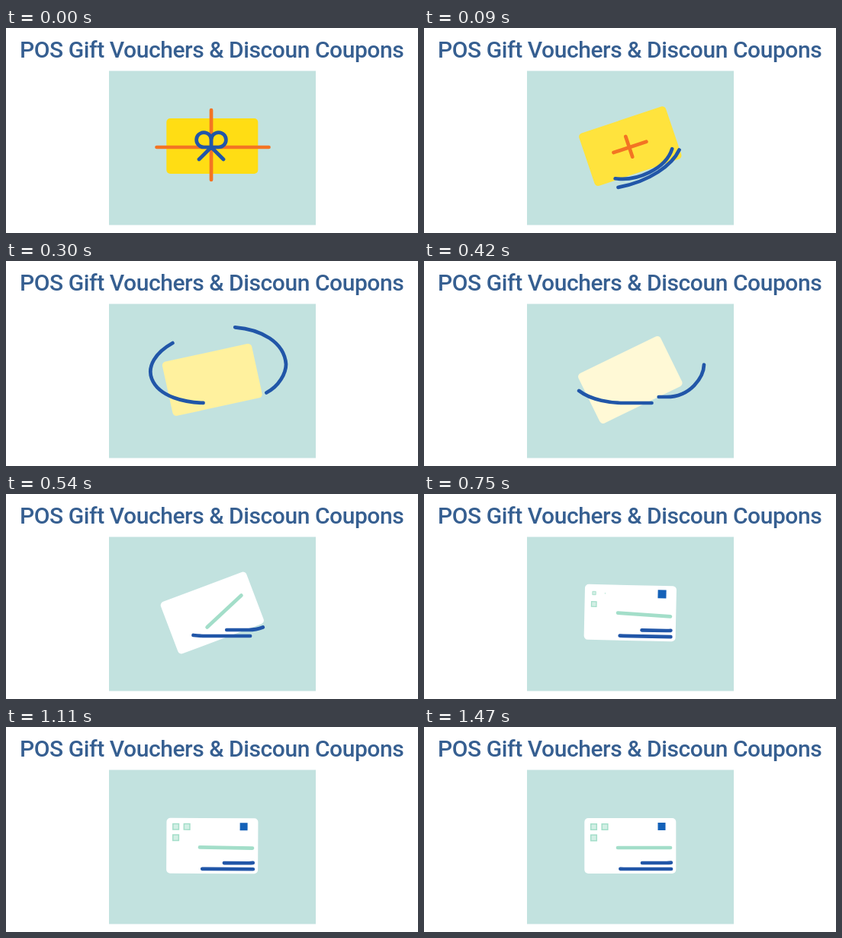
Recreate the animation shown at these times as an HTML page. Size 540 by 270 pixels, loop 2.4 s.

```html
<!DOCTYPE html>
<html lang="en">
<head>
<meta charset="utf-8">
<title>Gift vouchers</title>
<style>
  html, body { margin: 0; width: 100%; height: 100%; overflow: hidden; background: #fff; }
  svg { display: block; width: 100vw; height: 100vh; }
  text { font: 500 30px Roboto, sans-serif; letter-spacing: -0.44px; fill: #365f91; }
  .line { fill: none; stroke-width: 4.7; stroke-linecap: round; stroke-linejoin: round; }
  .blue { stroke: #2156a8; }
  .orange { stroke: #f37423; }
  .mint { stroke: #a3dec9; }
  .box { fill: #d3efe5; stroke: #a3dec9; stroke-width: 1.5; }
</style>
</head>
<body>
<svg viewBox="0 0 540 270">
  <text x="18" y="39">POS Gift Vouchers &amp; Discoun Coupons</text>
  <rect x="135" y="56.5" width="271" height="203" fill="#c2e2df"/>
  <rect id="card" x="-60" y="-36.5" width="120" height="73" rx="5"/>
  <g id="ribbon" class="line orange">
    <path id="across"/>
    <path id="down"/>
  </g>
  <path id="bow" class="line blue" d="M253 173L269 157H259.3A9.7 9.7 0 1 1 269 147.3V157L285 173M269 157H278.7A9.7 9.7 0 1 0 269 147.3"/>
  <g id="print">
    <rect id="badge" x="-5" y="-5" width="10" height="10" fill="#1461b8"/>
    <path id="strandA" class="line blue" d="M329 92C242 80 178 120 191 155C201 181 240 187 262 187H324"/>
    <path id="strandB" class="line blue" d="M221 116C254 70 363 80 367 136C367 152 350 179 318 179H286"/>
  </g>
  <path id="mint" class="line mint"/>
</svg>
<script>
const LOOP = 2400, STEP = 30, WIDTH = 4.7;
const $ = id => document.getElementById(id);

// Progress of t from a to b, then three easings of it.
const span = (t, a, b) => Math.min(1, Math.max(0, (t - a) / (b - a)));
const ease = (t, a, b) => {
  const u = span(t, a, b);
  return u ** 3 * (10 - 15 * u + 6 * u * u);
};
const easeOut = (t, a, b) => 1 - (1 - span(t, a, b)) ** 2;
const pop = (t, start) => {
  const v = span(t, start, start + 300) - 1;
  return 1 + 2.7 * v ** 3 + 1.7 * v * v;
};

const place = (el, x, y, turn = 0, size = 1) =>
  el.setAttribute("transform", `translate(${x} ${y}) rotate(${turn}) scale(${size})`);
const show = (el, on) => el.setAttribute("visibility", on ? "visible" : "hidden");

// Offset of the path while unwinding, when the tail lets go, length left at rest.
const strands = [
  { el: $("strandA"), dx: -14, dy: 0, release: 180, rest: 67 },
  { el: $("strandB"), dx: -23, dy: 12, release: 215, rest: 38 }
];
for (const s of strands) s.total = s.el.getTotalLength();

// Small squares by column and row, in order of appearance.
const boxes = [[0, 1], [0, 0], [1, 0]].map(([col, row]) => {
  const el = document.createElementNS("http://www.w3.org/2000/svg", "rect");
  for (const [k, v] of Object.entries({ x: -3.8, y: -3.8, width: 7.6, height: 7.6, class: "box" }))
    el.setAttribute(k, v);
  $("print").append(el);
  return { el, x: 222.5 + 14.5 * col, y: 131.5 + 14.5 * row };
});

function drawStrand({ el, dx, dy, release, rest, total }, t) {
  const slack = 70;
  const head = slack + (total - slack) * easeOut(t, 0, 620);
  const tail = (total - rest) * easeOut(t, release, 640);
  const size = 0.35 + 0.65 * ease(t, 0, 170);
  const away = 1 - ease(t, 180, 300);
  show(el, t > 0);
  place(el, 269 * (1 - size) + dx * away * size, 157 * (1 - size) + dy * away * size, 0, size);
  el.style.strokeWidth = WIDTH / size;
  el.style.strokeDasharray = `${head - tail} 999`;
  el.style.strokeDashoffset = -tail;
}

function drawMint(t, settle) {
  const swing = ease(t, 400, 680);
  const half = 34.5 * easeOut(t, 420, 600);
  show($("mint"), half > 0);
  place($("mint"), 283.5 + 5 * swing, 150 + 9 * swing, -90 + 94 * swing - 4 * settle);
  $("mint").setAttribute("d", `M${-half} 0H${half}`);
}

function draw(t) {
  // The card swings past half a turn, comes back and settles.
  const settle = ease(t, 750, 1300);
  const turn = -206 * ease(t, 0, 380) + 27.2 * ease(t, 440, 750) - 1.2 * settle;
  const fade = span(t, 0, 510);
  place($("card"), 270.3, 155.5 + ease(t, 0, 380), turn);
  $("card").setAttribute("fill", `rgb(255 ${221 + 34 * fade} ${20 + 235 * fade})`);

  const left = 1 - span(t, 0, 130);
  show($("ribbon"), left > 0);
  place($("ribbon"), 269.5, 157, turn);
  $("across").setAttribute("d", `M${-72 * left} 0H${75 * left}`);
  $("down").setAttribute("d", `M-.5 ${-49 * left}V${43 * left}`);
  show($("bow"), t === 0);

  $("print").setAttribute("transform", `rotate(${Math.max(0, turn + 180)} 270 156.5)`);
  for (const s of strands) drawStrand(s, t);
  boxes.forEach(({ el, x, y }, i) => place(el, x, y, 0, pop(t, 670 + 35 * i)));
  place($("badge"), 311.5, 131, 0, pop(t, 580));
  drawMint(t, settle);
}

const begin = performance.now();
function tick() {
  const t = (performance.now() - begin) % LOOP;
  draw(Math.floor(t / STEP) * STEP);
  requestAnimationFrame(tick);
}
tick();
</script>
</body>
</html>
```
